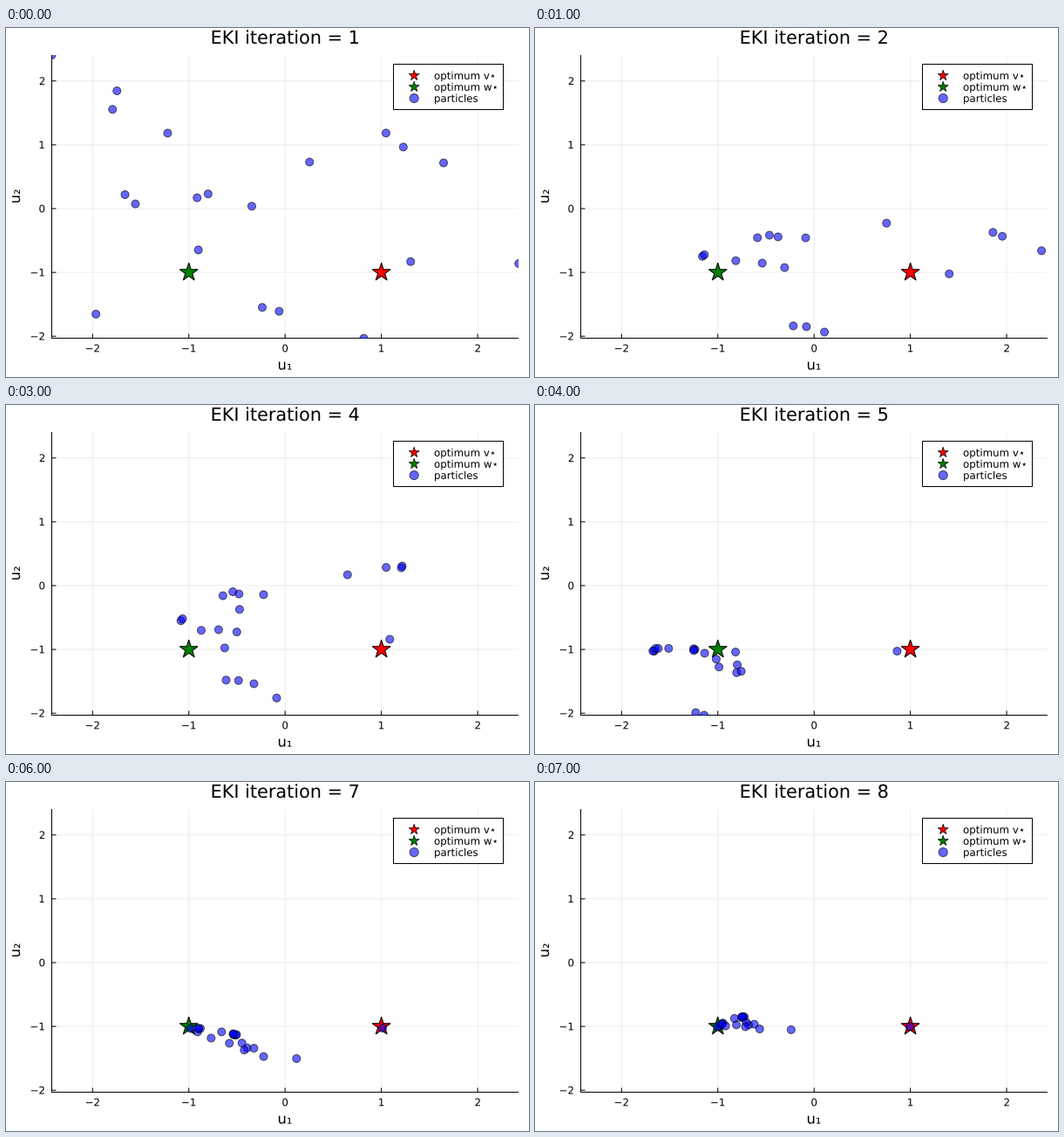
These frames come from a looping animation (600x400 px, 8000 ms). A matplotlib script:

```python
import numpy as np
import matplotlib.pyplot as plt
from matplotlib.animation import FuncAnimation
from matplotlib.patches import Circle, PathPatch, Polygon, Rectangle
from matplotlib.textpath import TextPath
from matplotlib.transforms import Affine2D

W, H, DPI = 600, 400, 100
PX = 72 / DPI                      # points per pixel
X0, Y0, SX, SY = 320.2, 207.0, 110.45, 73.13
LEFT, RIGHT, TOP, BOTTOM = 52.5, 588, 31, 355.5
OPT_V, OPT_W = np.array([1, -1]), np.array([-1, -1])
STEPS = 8

plt.rcParams["font.family"] = "DejaVu Sans"

# Initial ensemble in parameter space; the rest follows from the update rule
START = np.array([
    (-2.424, 2.407), (-1.747, 1.846), (-1.792, 1.555), (-1.220, 1.183),
    (-1.663, 0.219), (-1.555, 0.074), (-0.914, 0.170), (-0.800, 0.230),
    (-0.346, 0.038), (0.254, 0.730), (1.048, 1.184), (1.228, 0.965),
    (1.646, 0.717), (-0.901, -0.648), (1.304, -0.831), (2.427, -0.861),
    (-1.965, -1.653), (-0.237, -1.548), (-0.062, -1.609), (0.817, -2.033)])


def to_px(u):
    return np.array([X0, Y0]) + np.asarray(u) * [SX, -SY]


def kalman_step(u):
    """One ensemble Kalman inversion update towards zero loss."""
    loss = (np.linalg.norm(u - OPT_V, axis=1)
            * np.linalg.norm(u - OPT_W, axis=1))
    dev = loss - loss.mean()
    gain = dev @ u / (dev @ dev)
    return u - np.outer(loss, gain)


ensembles = [START]
while len(ensembles) < STEPS:
    ensembles.append(kalman_step(ensembles[-1]))

fig = plt.figure(figsize=(W / DPI, H / DPI), dpi=DPI, facecolor="white")
ax = fig.add_axes([0, 0, 1, 1])
ax.set_xlim(0, W)
ax.set_ylim(H, 0)
ax.axis("off")


def line(xs, ys, z=2, alpha=1):
    ax.plot(xs, ys, color="black", lw=PX, alpha=alpha, zorder=z,
            solid_capstyle="butt", snap=False)


def label(x, y, s, size, align=0.5, angle=0):
    """Text as outlines; align is 0 for left, 0.5 for centre, 1 for right."""
    path = TextPath((0, 0), s, size=size)
    box = path.get_extents()
    place = (Affine2D().translate(-align * (box.x0 + box.x1), 0)
             .scale(1, -1).rotate_deg(-angle).translate(x, y))
    return ax.add_patch(PathPatch(path, fc="black", lw=0, zorder=8,
                                  transform=place + ax.transData))


def star(center, color, radius, z, width=1):
    turn = np.arange(10) * np.pi / 5
    r = radius * np.where(np.arange(10) % 2, 0.382, 1)
    pts = np.column_stack([r * np.sin(turn), -r * np.cos(turn)]) + center
    ax.add_patch(Polygon(pts, fc=color, ec="black", lw=width * PX,
                         joinstyle="bevel", zorder=z))


def dot(center, radius, z):
    return ax.add_patch(Circle(center, radius, fc=(0, 0, 1, 0.6),
                               ec=(0, 0, 0, 0.6), lw=PX, zorder=z))


# Grid, ticks and axes
for k in range(-2, 3):
    x, y = to_px((k, k))
    name = str(k).replace("-", "\u2212")
    line([x, x], [TOP, BOTTOM], 1, 0.07)
    line([LEFT, RIGHT], [y, y], 1, 0.07)
    line([x, x], [BOTTOM, BOTTOM - 5])
    line([LEFT, LEFT + 5], [y, y])
    label(x, 371.3, name, 11.8)
    label(45, y + 4.3, name, 11.8, align=1)
line([LEFT, LEFT], [TOP, BOTTOM + 0.5])
line([LEFT - 0.5, RIGHT], [BOTTOM, BOTTOM])

title = label(234.6, 18, "EKI", 20.8, align=0)
label(X0, 391.5, "u\u2081", 16.3)
label(16, 192.7, "u\u2082", 16.3, angle=90)

# Optima and particles
star(to_px(OPT_V), "red", 11, 3)
star(to_px(OPT_W), "green", 11, 3)
window = Rectangle((LEFT, TOP), RIGHT - LEFT, BOTTOM - TOP,
                   transform=ax.transData)
particles = [dot((0, 0), 4.5, 4) for _ in START]
for p in particles:
    p.set_clip_path(window)

# Legend
ax.add_patch(Rectangle((444.5, 41.5), 126, 52, fc="white", ec="black",
                       lw=PX, snap=False, zorder=6))
star((468.2, 54.5), "red", 6.3, 7, 0.7)
star((468.2, 67.5), "green", 6.3, 7, 0.7)
dot((468.2, 80.5), 5.1, 7)
for i, s in enumerate(("optimum v\u22c6", "optimum w\u22c6", "particles")):
    label(491, 58.8 + 13 * i, s, 11.8, align=0)


def update(i):
    for p, center in zip(particles, to_px(ensembles[i])):
        p.set_center(center)
    title.set_path(TextPath((0, 0), f"EKI iteration = {i + 1}", size=20.8))
    return [*particles, title]


anim = FuncAnimation(fig, update, frames=STEPS, interval=1000,
                     repeat=True, repeat_delay=0, blit=False)
plt.show()
```
